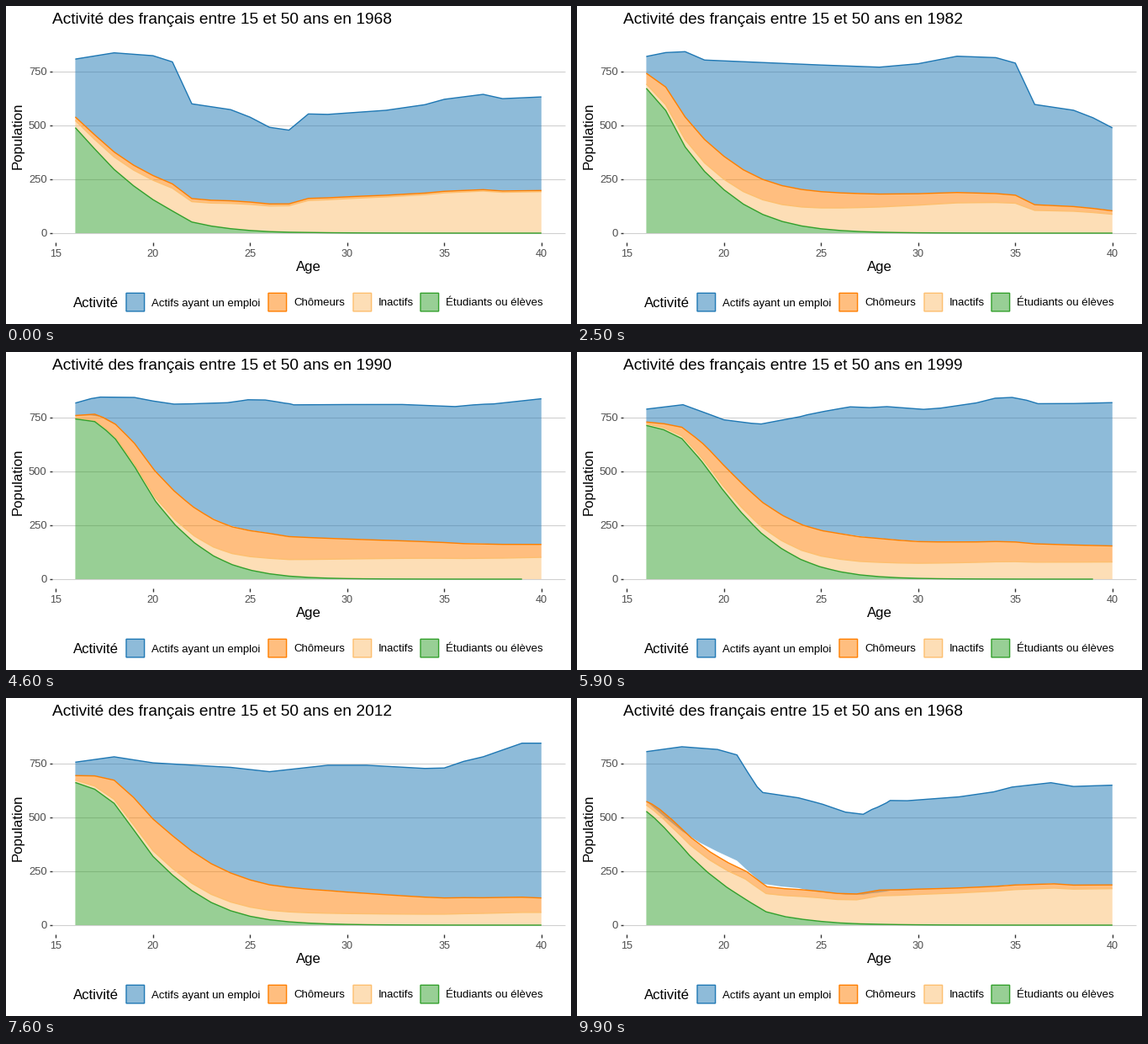
A matplotlib script for the animation above (10000 ms loop, 672 by 378 pixels).

```python
import numpy as np
import matplotlib.pyplot as plt
from matplotlib.animation import FuncAnimation
from matplotlib.patches import Polygon, Rectangle

W, H, DPI = 672, 378, 100
PX = 72 / DPI  # points per pixel
AGES = np.arange(16, 41)
COLORS = ["#1f78b4", "#ff7f00", "#fdbf6f", "#33a02c"]
LABELS = ["Actifs ayant un emploi", "Chômeurs", "Inactifs", "Étudiants ou élèves"]

STARTS = [7, 20, 33, 46, 59, 71, 83, 95]  # first frame of each transition
STEPS = 6
FRAMES = 100

# Size of each generation by year of birth, linear in between.
BIRTHS = {
    1928: 632, 1930: 624, 1931: 644, 1933: 621, 1934: 596, 1936: 570,
    1939: 551, 1940: 553, 1941: 478, 1942: 491, 1943: 538, 1944: 573,
    1946: 600, 1947: 793, 1948: 820, 1950: 830, 1952: 798, 1954: 785,
    1957: 800, 1963: 806, 1964: 842, 1965: 842, 1966: 828, 1969: 815,
    1971: 840, 1973: 835, 1975: 768, 1977: 722, 1981: 742, 1983: 742,
    1986: 712, 1988: 732, 1992: 753, 1994: 781, 1996: 756, 2001: 800,
}


def along(points, x):
    return np.interp(x, list(points), list(points.values()))


def rise(x):
    return 1 / (1 + np.exp(-x))


def share_students(top, mid, early, late):
    """Falling logistic with one slope before the midpoint and one after."""
    d = AGES - mid
    return top * rise(-d * np.where(d < 0, early, late))


def share_inactive(top, mid, width):
    return top * rise((AGES - mid) / width)


def share_jobless(level, fade, mid):
    """Quick rise on leaving school, then a slow decay."""
    return level * np.exp((22 - AGES) / fade) * rise(AGES - mid)


def stack(year, students, inactive, jobless, scale, leavers=0, last=40):
    """Four stacked paths with columns age, low, high."""
    total = along(BIRTHS, year - AGES) * along(scale, AGES)
    green = total * share_students(*students)
    inact = total * share_inactive(*inactive) + leavers * np.exp(-3 * (AGES - 16))
    low = green + inact
    edges = [total, low + total * share_jobless(*jobless), low, green, 0 * total]
    paths = [np.column_stack([AGES, lo, hi]) for hi, lo in zip(edges, edges[1:])]
    paths[-1] = paths[-1][AGES <= last]
    return year, paths


STATES = [
    stack(1968, (0.80, 17.5, 0.76, 0.47), (0.305, 21.8, 3.1), (0.024, 18, 15.5),
          {16: 1.012, 22: 1}),
    stack(1975, (0.66, 18.5, 1.10, 0.49), (0.26, 22.2, 3.6), (0.047, 14, 16.2),
          {16: 1.01, 25: 0.985, 32: 1}, leavers=110),
    stack(1982, (0.95, 18.0, 0.92, 0.51), (0.18, 22.3, 3.4), (0.12, 14, 16.7),
          {16: 0.99, 18: 1, 25: 0.975, 35: 0.995}),
    stack(1990, (0.95, 19.7, 0.85, 0.56), (0.125, 24, 2.3), (0.166, 20, 18.6),
          {16: 1.027, 22: 1.015, 26: 1, 30: 1.013}, last=39),
    stack(1999, (0.96, 20.55, 0.62, 0.56), (0.10, 23, 3.0), (0.17, 30, 19.0),
          {16: 1.06, 18: 1.1, 20: 1.015, 27: 0.968, 31: 0.975, 34: 1, 40: 1.02},
          last=39),
    stack(2007, (0.95, 20.1, 0.68, 0.54), (0.085, 21.5, 3.0), (0.17, 24, 18.6),
          {16: 1.07, 21: 0.98, 28: 1}, last=39),
    stack(2012, (0.93, 19.65, 0.76, 0.51), (0.07, 20, 3.0), (0.205, 19, 18.2),
          {34: 1, 36: 1.02, 40: 1.008}),
    stack(2017, (0.95, 20.2, 0.75, 0.55), (0.075, 20.5, 3.0), (0.205, 26, 18.4),
          {19: 0.99, 21: 0.93, 23: 0.87, 25: 0.89, 30: 0.98, 40: 1.02}),
]


def refine(path, n=50):
    """Split the longest segments until the path has n points."""
    length = np.hypot(np.diff(path[:, 0]), np.diff(path[:, 2]))
    pieces = np.ones(len(length), int)
    for _ in range(n - len(path)):
        pieces[np.argmax(length / pieces)] += 1
    parts = [np.linspace(a, b, p, endpoint=False)
             for a, b, p in zip(path, path[1:], pieces)]
    return np.vstack(parts + [path[-1:]])


def pose(frame):
    """Year and the four paths shown at a frame."""
    begun = sum(s <= frame for s in STARTS)
    if begun == 0:
        return STATES[0]
    old, new = STATES[begun - 1], STATES[begun % len(STATES)]
    t = (frame - STARTS[begun - 1] + 1) / STEPS
    if t >= 1:
        return new
    paths = [(1 - t) * refine(a) + t * refine(b) for a, b in zip(old[1], new[1])]
    return (new if t >= 0.5 else old)[0], paths


def px_x(age):
    return 54.7 + (age - 14.8) * 23.1


def px_y(count):
    return 270 - count * 0.2562


plt.rcParams["font.family"] = "Liberation Sans"
fig = plt.figure(figsize=(W / DPI, H / DPI), dpi=DPI, facecolor="white")
ax = fig.add_axes([0, 0, 1, 1])
ax.set(xlim=(0, W), ylim=(H, 0))
ax.axis("off")


def text(x, y, s, size, color="black", **kw):
    kw.setdefault("va", "baseline")
    return ax.text(x, y, s, fontsize=size * PX, color=color, **kw)


def line(xs, ys, color, width):
    return ax.plot(xs, ys, color=color, lw=width * PX, solid_capstyle="butt")[0]


for count in (0, 250, 500, 750):
    y = px_y(count)
    line([55, 665], [y, y], "#d0d0d0", 1.1)
    line([51.5, 55], [y, y], "#333333", 1.4)
    text(48.5, y + 4.4, str(count), 13, "#4d4d4d", ha="right")
for age in range(15, 41, 5):
    x = px_x(age)
    line([x, x], [281, 284.7], "#333333", 1.4)
    text(x, 297.5, str(age), 12.6, "#4d4d4d", ha="center")

title = text(55, 21, "", 19.2)
text(360, 315, "Age", 16.7, ha="center")
text(21.5, 154, "Population", 16.7, rotation=90, ha="right", va="center")
text(80, 358, "Activité", 16.7)
for x, color, label in zip((143, 312, 413, 493), COLORS, LABELS):
    box = dict(xy=(x, 341.3), width=21.6, height=21.6, snap=False)
    ax.add_patch(Rectangle(fc=color, alpha=0.5, lw=0, **box))
    ax.add_patch(Rectangle(fc="none", ec=color, lw=1.4 * PX, **box))
    text(x + 30, 356.5, label, 13.3)

areas, tops = [], []
for i, color in enumerate(COLORS):
    area = Polygon([(0, 0), (1, 1), (0, 1)], fc=color, alpha=0.5, lw=0, zorder=5 + i)
    areas.append(ax.add_patch(area))
    tops.append(line([], [], color, 1.4))
    tops[-1].set_zorder(5.5 + i)


def draw(frame):
    year, paths = pose(frame)
    title.set_text(f"Activité des français entre 15 et 50 ans en {year}")
    for path, area, top in zip(paths, areas, tops):
        x, low, high = px_x(path[:, 0]), px_y(path[:, 1]), px_y(path[:, 2])
        area.set_xy(np.column_stack([np.append(x, x[::-1]),
                                     np.append(high, low[::-1])]))
        top.set_data(x, high)
    return [title, *areas, *tops]


anim = FuncAnimation(fig, draw, frames=FRAMES, interval=100, repeat=True,
                     repeat_delay=0, blit=False)
plt.show()
```
